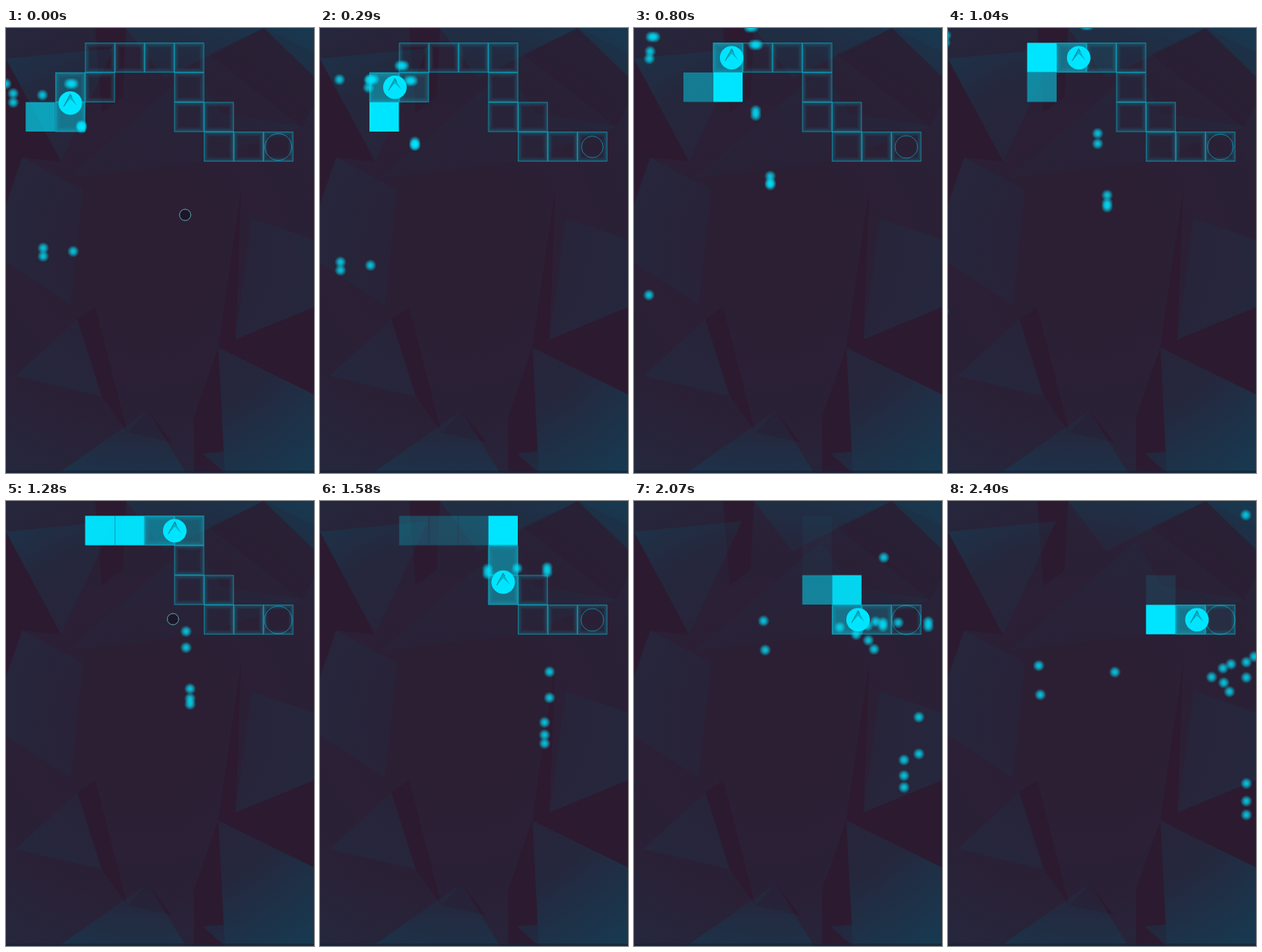
An HTML page with a canvas for the animation above (2430 ms loop, 380 by 550 pixels).

```html
<!DOCTYPE html>
<html lang="en">
<head>
<meta charset="utf-8">
<title>Path game</title>
<style>
  html, body { margin: 0; width: 100%; height: 100%; overflow: hidden; background: #2d1d32; }
  svg, canvas { position: absolute; left: 0; top: 0; width: 380px; height: 550px; }
</style>
</head>
<body>
<svg viewBox="0 0 380 550">
  <defs>
    <radialGradient id="teal" gradientUnits="userSpaceOnUse" cx="170" cy="270" r="370">
      <stop offset="0" stop-color="#00566f" stop-opacity=".03"/>
      <stop offset=".6" stop-color="#00566f" stop-opacity=".12"/>
      <stop offset="1" stop-color="#00566f" stop-opacity=".42"/>
    </radialGradient>
  </defs>
  <rect width="380" height="550" fill="#2d1d32"/>
  <rect width="380" height="550" fill="url(#teal)" opacity=".55"/>
  <g fill="#2d1a2f" opacity=".8">
    <path d="M110 0H148L144 85 118 105ZM0 38 68 165 20 160 0 215Z"/>
    <path d="M262 395 290 200 283 385 380 345V453ZM262 395 270 550H232V480Z"/>
    <path d="M88 360 110 345 150 500 175 473 205 512 150 500 118 455Z"/>
    <path d="M318 0 250 32 365 122 380 95V30Z" opacity=".5"/>
  </g>
  <g fill="url(#teal)">
    <path d="M0 38 133 25 68 165ZM148 0H318L195 62ZM318 0H380V60Z"/>
    <path d="M232 50 265 105 365 122 245 165 75 185Z" opacity=".6"/>
    <path d="M20 160 0 220V290L80 342 95 200Z"/>
    <path d="M88 360 12 430 118 455ZM65 550 175 473 222 550Z"/>
    <path d="M303 235 380 262V345L283 385Z"/>
    <path d="M262 395 380 453V550H270ZM243 526 380 513V550H270Z"/>
  </g>
  <rect y="547" width="380" height="3" fill="#142238" opacity=".6"/>
</svg>
<canvas id="stage" width="380" height="550"></canvas>
<script>
const ctx = document.getElementById('stage').getContext('2d');
const LOOP = 2430, CELL = 36.67, LEFT = 24.3, TOP = 18.3, BALL = 14.5;
const KEYS = [0, 530, 800, 1280, 1580, 2070, 2400, LOOP];
const distanceKeys = [53.7, 114.3, 151, 238.7, 320, 417, 447.8, 450.5];
const driftKeys = [0, 45, 75, 134, 184, 240, 275, 278];
const goalKeys = [16.5, 11.5, 14, 17, 14, 18, 18, 18];

// Walk the path from its first cell: right, up, down
const path = [[0, 2]];
for (const step of 'RURURRRDDRDRR') {
  const [c, r] = path[path.length - 1];
  path.push([c + (step === 'R'), r + (step === 'D') - (step === 'U')]);
}
const fadeStart = [-140, 310, 580, 850, 1270, 1270, 1270, 1685, 1685, 1870, 2040];

// Sparks: drift value at which the points hold, velocity, spread in vy, visible range
const sparks = [
  { at: 0, v: [-.86, .72], pts: [46, 272, 46, 282, 83, 276] },
  { at: 0, v: [-.87, -.8], pts: [0, 69, 9, 81, 9, 92, 45, 83] },
  { at: 45, v: [-.8, -1.03], from: 8, pts: [50, 42, 45, 42] },
  { at: 45, v: [-.8, -.7], from: 8, pts: [44, 50, 43, 59] },
  { at: 0, v: [.85, -.93], pts: [78, 69, 83, 69] },
  { at: 45, v: [.75, -.87], from: 20, pts: [125, 47, 130, 47] },
  { at: 134, v: [1, .83], spread: .07, pts: [227, 232, 227, 244, 227, 251] },
  { at: 134, v: [1.22, 1], spread: .24, from: 47, pts: [222, 161, 222, 181] },
  { at: 184, v: [1.48, 1.2], from: 160, pts: [280, 82, 280, 88, 243, 83] },
  { at: 184, v: [-.82, 1.1], spread: .58, from: 165, to: 238, pts: [207, 84, 207, 90] },
  { at: 240, v: [-1.37, 1.58], from: 238, pts: [160, 148, 162, 184, 254, 156] },
  { at: 240, v: [1.69, -1.5], from: 215, pts: [308, 70] },
  { at: 240, v: [1.46, 1.5], from: 222, pts: [289, 172, 296, 183, 298, 149, 274, 165, 288, 154] },
  { at: 240, v: [1.74, 1.4], spread: .4, from: 222, pts: [307, 150, 307, 155] }
];
const taps = [
  { from: 0, to: 200, x: 221, y: 231 },
  { from: 430, to: 600, x: 145, y: 158 },
  { from: 1180, to: 1400, x: 206, y: 146 }
];

const clamp = v => Math.max(0, Math.min(1, v));
const cyan = a => `rgba(0,229,255,${a})`;

// Smooth curve through the keys
function curve(values, t) {
  let i = 0;
  while (i < KEYS.length - 2 && t >= KEYS[i + 1]) i++;
  const slope = k => {
    const a = Math.max(0, k - 1), b = Math.min(KEYS.length - 1, k + 1);
    return (values[b] - values[a]) / (KEYS[b] - KEYS[a]);
  };
  const h = KEYS[i + 1] - KEYS[i], u = (t - KEYS[i]) / h, w = 1 - u;
  return values[i] * (1 + 2 * u) * w * w + values[i + 1] * u * u * (3 - 2 * u)
    + h * u * w * (slope(i) * w - slope(i + 1) * u);
}

function circle(x, y, r) {
  ctx.beginPath();
  ctx.arc(x, y, r, 0, 7);
}

function drawCell(i, dist, t) {
  const x = LEFT + path[i][0] * CELL, y = TOP + path[i][1] * CELL;
  const edge = CELL / 2 + BALL;
  const tint = .42 * clamp((dist - i * CELL + edge) / 25);
  const lit = clamp((dist - i * CELL - edge) / 6);
  const fade = clamp(1 - (t - (fadeStart[i] ?? LOOP)) / 400);
  ctx.fillStyle = cyan((tint + (1 - tint) * lit) * fade);
  ctx.fillRect(x, y, 36.4, 36.4);
  if (lit === 1) return;
  for (let k = 0; k < 7; k++) {
    ctx.strokeStyle = cyan((k ? .24 * (1 - k / 7) ** 1.6 : .5) * (1 - lit));
    ctx.strokeRect(x + k + .3, y + k + .3, CELL - 2 * k - .6, CELL - 2 * k - .6);
  }
}

function drawBall(dist) {
  const i = Math.floor(dist / CELL), u = dist / CELL - i;
  const at = k => LEFT + CELL * (path[i][k] + (path[i + 1][k] - path[i][k]) * u + .5);
  ctx.save();
  ctx.translate(at(0), at(1) + TOP - LEFT);
  ctx.fillStyle = '#00e5ff';
  circle(0, 0, BALL);
  ctx.fill();
  ctx.fillStyle = '#00b3c8';
  ctx.fill(new Path2D('M0-11 8 3 0-5-8 4Z'));
  ctx.strokeStyle = '#087f94';
  ctx.stroke(new Path2D('M-8 4 0-11 2-7'));
  ctx.restore();
}

function drawSpark(x, y) {
  const glow = ctx.createRadialGradient(x, y, 0, x, y, 7.5);
  glow.addColorStop(0, cyan(.85));
  glow.addColorStop(.4, cyan(.65));
  glow.addColorStop(1, cyan(0));
  ctx.fillStyle = glow;
  circle(x, y, 7.5);
  ctx.fill();
}

function drawSparks(drift) {
  for (const { at, v, spread = 0, from = 0, to = 999, pts } of sparks) {
    if (drift < from || drift >= to) continue;
    for (let k = 0; k < pts.length; k += 2) {
      const d = drift - at;
      drawSpark(pts[k] + v[0] * d, pts[k + 1] + (v[1] + spread * k / 2) * d);
    }
  }
}

function draw(now) {
  const t = now % LOOP, dist = curve(distanceKeys, t);
  ctx.clearRect(0, 0, 380, 550);
  ctx.lineWidth = 1;
  path.forEach((_, i) => drawCell(i, dist, t));
  ctx.strokeStyle = cyan(.45);
  circle(336, 147, curve(goalKeys, t));
  ctx.stroke();
  drawSparks(curve(driftKeys, t));
  drawBall(dist);
  for (const tap of taps) {
    if (t < tap.from || t >= tap.to) continue;
    circle(tap.x, tap.y, 7);
    ctx.fillStyle = '#1b1728';
    ctx.fill();
    ctx.strokeStyle = '#639aa6';
    ctx.stroke();
  }
  requestAnimationFrame(() => draw(performance.now() - start));
}
const start = performance.now();
draw(0);
</script>
</body>
</html>
```
